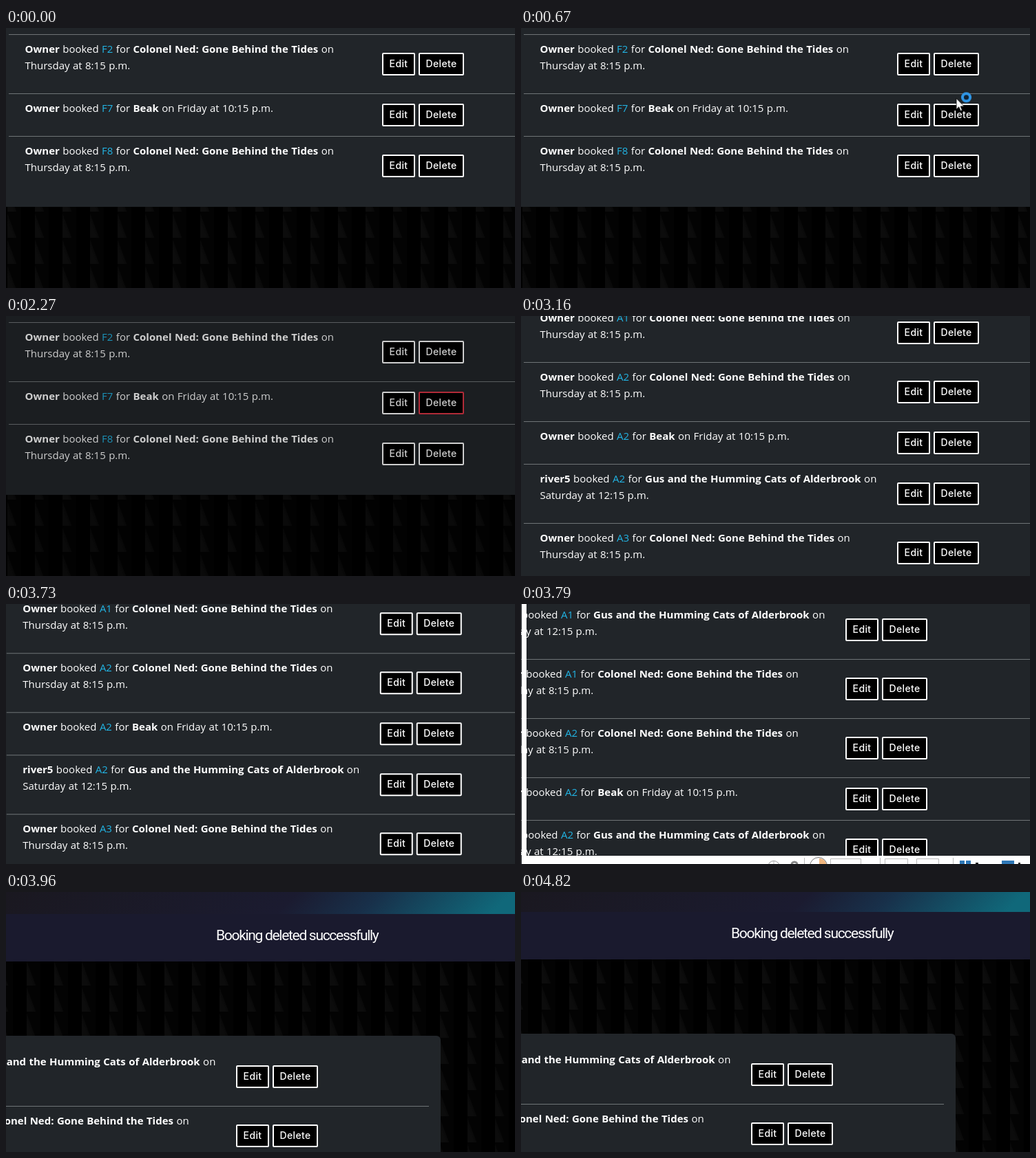
An HTML page that plays this animation: 739x378 px, repeating every 5.33 s.

```html
<!DOCTYPE html>
<html lang="en">
<head>
<meta charset="utf-8">
<title>Bookings</title>
<style>
  :root { --loop: 5330ms linear infinite; --cut: 5330ms step-end infinite; }
  html, body { margin: 0; width: 100%; height: 100%; overflow: hidden; background: #000; }
  #stage {
    position: relative; width: 739px; height: 378px; overflow: hidden; background: #000;
    font: 15px/24px "Open Sans", "Noto Sans", sans-serif; color: #fff; word-spacing: .5px; white-space: nowrap;
  }
  #stage div, svg { position: absolute; }
  .view { inset: 0; }
  .weave {
    background:
      linear-gradient(69.3deg, #0c0c0c 8px, #090909 12px, transparent 13px),
      linear-gradient(90deg, #030303 20px, #000 20px);
    background-size: 40px 38px;
  }
  .panel { left: -13px; width: 856px; background: #212529; border-radius: 6px; }

  .row { left: 4px; width: 822px; border-top: 1px solid #6f7476; }
  #after .row:first-child { border-color: transparent; }
  .row p { margin: 8px 0 0 23.5px; }
  .row i { font-style: normal; color: #22b4e4; }
  .btn {
    position: absolute; top: 26px; box-sizing: border-box; height: 33px;
    border: 2px solid #fff; border-radius: 2px; background: #000;
    font: 500 14px/28px Inter, sans-serif; letter-spacing: .35px; text-align: center;
  }
  .short .btn { top: 14px; }
  .edit { left: 542px; width: 48px; }
  .del { left: 595px; width: 66px; }

  #before { animation: before var(--cut); }
  #after { animation: after var(--cut); }
  #page { inset: 0; animation: pan var(--loop); }
  #before .panel { top: -20px; height: 280px; }
  #before .weave { left: 0; top: 260px; width: 739px; height: 118px; background-position: 2px 7px; }
  #after .weave { left: -20px; top: -260px; width: 1000px; height: 900px; background-position: 22px 28px; }
  #after .panel { top: -121px; height: 800px; }
  .rows { left: 0; top: 0; }
  .hero {
    left: 0; top: -358px; width: 951px; height: 60px;
    background: linear-gradient(135deg, #1a1820 170px, #1b1b30 470px, #18304a 555px, #10687a 690px);
  }
  .flash {
    left: 0; top: -298px; width: 951px; height: 69px; background: #1a1a2e;
    font: 21px/63px Roboto, sans-serif; letter-spacing: -1.3px; text-indent: 517px; word-spacing: 0;
  }

  #before .row:nth-child(2) .del { animation: hover var(--loop); }
  #before .row:nth-child(3) .del { animation: brush var(--loop); }
  #dim { inset: 0; background: #000; opacity: 0; animation: dim var(--loop); }
  #frame { inset: 0; animation: frame var(--cut); }
  #frame svg { left: 0; top: 0; }
  #cursor { left: 0; top: 0; overflow: visible; animation: move var(--loop); }
  #arrow { animation: arrow var(--cut); }
  #ring { animation: ring var(--cut); }
  #hand { animation: hand var(--cut); }

  @keyframes before { 0% { visibility: visible } 59.28%, 100% { visibility: hidden } }
  @keyframes after { 0% { visibility: hidden } 59.28%, 100% { visibility: visible } }
  @keyframes pan {
    0%, 69.95% { transform: none }
    71.11%, 71.3% { transform: translate(-75px, 99px) }
    74.1%, 80.7% { transform: translate(-212px, 330px) }
    81.2%, 100% { transform: translate(-212px, 327px) }
  }
  @keyframes hover { 0%, 13.5% { border-color: #fff } 16.5%, 100% { border-color: #dc3545 } }
  @keyframes brush { 0%, 7.9%, 11.4%, 100% { border-color: #fff } 9.3% { border-color: #ee9aa2 } }
  @keyframes dim { 0%, 19.2%, 43.3%, 100% { opacity: 0 } 21.3%, 41.3% { opacity: .57 } }
  @keyframes frame { 0%, 70.4%, 73.7%, 100% { visibility: hidden } 70.41% { visibility: visible } }
  @keyframes move {
    0%, 3.37% { transform: translate(694px, 366px) }
    6.5% { transform: translate(668px, 290px) }
    8.5% { transform: translate(650px, 200px) }
    11.4% { transform: translate(634px, 95px) }
    12.57% { transform: translate(632px, 102px) }
    13.3% { transform: translate(633px, 112px) }
    15%, 25.4% { transform: translate(635px, 120px) }
    27.2%, 50% { transform: translate(700px, 5px) }
    50.1%, 84.5% { transform: translate(537px, -12px) }
    90.4%, 100% { transform: translate(678px, 378px) }
  }
  @keyframes arrow {
    0%, 13.6%, 27.39%, 90.4%, 100% { opacity: 0 }
    3.37%, 25.5%, 84.6% { opacity: 1 }
  }
  @keyframes ring { 0%, 13.3%, 100% { opacity: 0 } 11.2% { opacity: 1 } }
  @keyframes hand { 0%, 25.5%, 100% { opacity: 0 } 13.6% { opacity: 1 } }
</style>
</head>
<body>
<div id="stage">
  <div id="before" class="view">
    <div class="weave"></div>
    <div class="panel"></div>
    <div class="rows"></div>
  </div>
  <div id="after" class="view">
    <div id="page">
      <div class="weave"></div>
      <div class="hero"></div>
      <div class="flash">Booking deleted successfully</div>
      <div class="panel"></div>
      <div class="rows"></div>
    </div>
  </div>
  <div id="dim"></div>
  <div id="frame">
    <svg width="739" height="378" fill="none" stroke="#bbb">
      <path d="M1 0H8V366H739V378H1Z" fill="#fff" stroke="none"/>
      <circle cx="367" cy="382" r="8.5" stroke="#999"/>
      <path d="M367 374V378"/>
      <circle cx="397" cy="379" r="4" stroke="#888" stroke-width="3"/>
      <path d="M411.5 369V378M521.5 369V378M627.5 369V378M449.5 378V370.5H493.5V378M528.5 378V370.5H561.5V378M574.5 378V370.5H606.5V378"/>
      <path d="M433 381V370A11 11 0 0 1 444 381Z" fill="#f0b67f" stroke="none"/>
      <circle cx="432" cy="381" r="12.5" stroke="#777"/>
      <path d="M637 373H644V378H637ZM646 373H653V378H646ZM698 373H716V378H698Z" fill="#2f78b7" stroke="none"/>
      <path d="M660 377H664M722 377H725" stroke="#222" stroke-width="2"/>
    </svg>
  </div>
  <svg id="cursor" width="24" height="24" stroke="#000" stroke-width=".8">
    <path id="arrow" fill="#fff" d="M0 0V16L3.7 12.5 6.2 18.3 8.6 17.3 6.2 11.7H11.3Z"/>
    <circle id="ring" cx="14.5" cy="-1.5" r="5.6" fill="#123" stroke="#2f97e8" stroke-width="4"/>
    <path id="hand" fill="#fff" transform="translate(-6)" d="M5 12V2a2 2 0 0 1 4 0V8q2-1 3.5.6 2-1 3.5.8 2-.6 2 2V16q0 4-3 6H8L1 14q-1-2 1-2.5Z"/>
  </svg>
</div>
<script>
  const tides = ["Colonel Ned: Gone Behind the Tides", "<br>Thursday at 8:15 p.m."];
  const beak = ["Beak", " Friday at 10:15 p.m."];
  const cats = ["Gus and the Humming Cats of Alderbrook", "<br>Saturday at 12:15 p.m."];

  function list(view, top, bookings) {
    let html = "";
    for (const [who, seat, [film, when]] of bookings) {
      const short = !when.startsWith("<br>");
      html += `<div class="row${short ? " short" : ""}" style="top:${top}px">
        <p><b>${who}</b> booked <i>${seat}</i> for <b>${film}</b> on${when}</p>
        <span class="btn edit">Edit</span><span class="btn del">Delete</span></div>`;
      top += short ? 62 : 86;
    }
    document.querySelector(view + " .rows").innerHTML = html;
  }

  list("#before", 9, [["Owner", "F2", tides], ["Owner", "F7", beak], ["Owner", "F8", tides]]);
  list("#after", -105, [
    ["river5", "A1", cats], ["Owner", "A1", tides], ["Owner", "A2", tides],
    ["Owner", "A2", beak], ["river5", "A2", cats], ["Owner", "A3", tides]
  ]);
</script>
</body>
</html>
```
